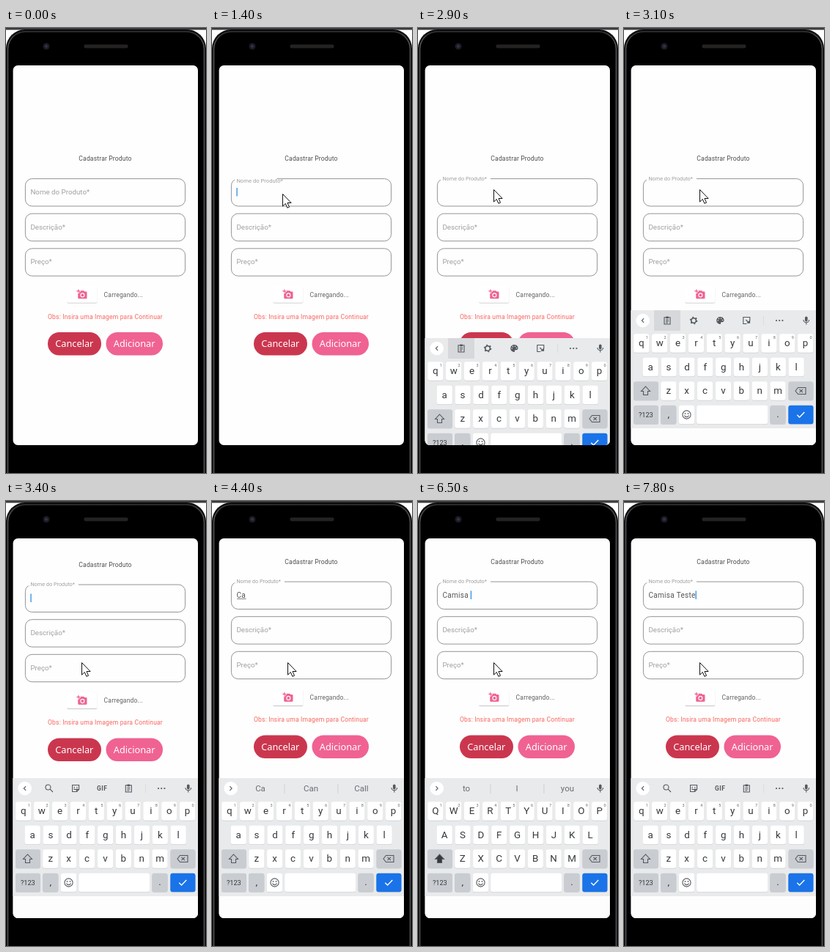
An HTML page for the animation above (8000 ms loop, 273 px wide and 607 px high).

```html
<!DOCTYPE html>
<html lang="pt">
<head>
<meta charset="utf-8">
<style>
html, body { margin: 0; width: 100%; height: 100%; overflow: hidden; background: #000; }
svg { display: block; width: 273px; height: 607px; font-family: Roboto, sans-serif; }
text { white-space: pre; }
.body { font-size: 8.58px; letter-spacing: .153px; }
.label { font-size: 9.75px; fill: #a0a0a0; }
.typed { font-size: 10px; letter-spacing: .3px; fill: #555; }
.button { font: 12.75px "Noto Sans", "Open Sans", sans-serif; fill: #fff; text-anchor: middle; }
.key { font-size: 13.4px; fill: #36393d; text-anchor: middle; }
.digit { font-size: 5.6px; fill: #666a70; text-anchor: middle; }
.word { font-size: 11.5px; fill: #6a6e73; text-anchor: middle; }
.line { fill: none; stroke: #55595e; stroke-width: 1.1; }
</style>
</head>
<body>
<svg viewBox="0 0 273 607">
  <defs>
    <clipPath id="screen"><rect x="9.6" y="51" width="252.4" height="518" rx="6.5"/></clipPath>
    <linearGradient id="rim" x2="1" y2="0">
      <stop offset="0" stop-color="#55585c"/><stop offset=".05" stop-color="#333538"/>
      <stop offset=".95" stop-color="#333538"/><stop offset="1" stop-color="#55585c"/>
    </linearGradient>
    <filter id="shadow" x="-20%" y="-20%" width="140%" height="160%">
      <feDropShadow dx="0" dy=".8" stdDeviation=".7" flood-opacity=".28"/>
    </filter>
  </defs>

  <rect width="273" height="607" fill="#fff"/>
  <rect width="273" height="2.5" fill="#3a3a3d"/>
  <rect x="0" y="2" width="273" height="650" rx="26" fill="#0b0b0c"/>
  <rect x="2.5" y="5" width="268" height="650" rx="24" fill="#000" stroke="url(#rim)" stroke-width="1.5"/>
  <circle cx="55" cy="25" r="4.5" fill="#1b1b24"/>
  <circle cx="55" cy="25" r="2" fill="#33334a"/>
  <rect x="106.5" y="22.5" width="60" height="5" rx="2" fill="#252222"/>

  <g clip-path="url(#screen)">
    <rect x="9" y="51" width="254" height="519" fill="#fefefe"/>
    <g id="page">
      <text class="body" x="135.5" y="181" text-anchor="middle" fill="#4c4c4c">Cadastrar Produto</text>
      <g id="fields"></g>
      <rect id="gap" x="29" y="204" height="3" fill="#fefefe"/>
      <text id="name" class="label">Nome do Produto*</text>
      <text class="label" x="33.4" y="274.6">Descrição*</text>
      <text class="label" x="33.4" y="322.2">Preço*</text>
      <text id="typed" class="typed" x="33.5" y="227.3"></text>
      <rect id="underline" x="34" y="228.5" height=".8" fill="#666"/>
      <rect id="caret" y="218" width="1.3" height="11.5" fill="#2f8fe0"/>
      <rect x="83" y="352" width="41.5" height="22.5" rx="2" fill="#fff" filter="url(#shadow)"/>
      <path transform="translate(96.4 355.8) scale(.613)" fill="#f06292" fill-rule="evenodd" d="M3 4V1h2v3h3v2H5v3H3V6H0V4zM6 10V7h3V4h7l1.8 2H21a2 2 0 0 1 2 2v12a2 2 0 0 1-2 2H5a2 2 0 0 1-2-2V10zM13 19a5 5 0 1 0 0-10 5 5 0 0 0 0 10zM13 17.2a3.2 3.2 0 1 1 0-6.4 3.2 3.2 0 0 1 0 6.4z"/>
      <text class="body" x="133.6" y="366.5" fill="#606060">Carregando...</text>
      <text class="body" x="135.5" y="396.6" text-anchor="middle" fill="#f8665e">Obs: Insira uma Imagem para Continuar</text>
      <rect x="57" y="415" width="73" height="31.5" rx="15.7" fill="#cb364f"/>
      <text class="button" x="93.3" y="435.2">Cancelar</text>
      <rect x="136.5" y="415" width="77.5" height="31.5" rx="15.7" fill="#f06292"/>
      <text class="button" x="175.2" y="435.2">Adicionar</text>
    </g>

    <g id="keyboard">
      <rect x="9" y="378" width="254" height="220" fill="#fdfdfd"/>
      <rect x="9" y="378" width="254" height="161" fill="#e8eaec"/>
      <g id="bar"></g>
      <g id="keys"></g>
    </g>
  </g>
  <path id="pointer" d="M0 0V16.6L3.8 13 6.4 18.8 9 17.7 6.5 12H11.6Z" fill="#fff" stroke="#111"/>
</svg>

<script>
const LOOP = 8000;
const $ = id => document.getElementById(id);
const set = (id, attrs) => Object.entries(attrs).forEach(([k, v]) => $(id).setAttribute(k, v));

const rect = (x, y, w, h, fill, rx = 3) =>
  `<rect x="${x}" y="${y}" width="${w}" height="${h}" rx="${rx}" fill="${fill}"/>`;
const text = (cls, x, y, s, extra = "") => `<text class="${cls}" x="${x}" y="${y}" ${extra}>${s}</text>`;
const at = (x, y, body) => `<g transform="translate(${x} ${y})">${body}</g>`;
const line = (d, extra = "") => `<path class="line" d="${d}" ${extra}/>`;
const dot = (x, y, r, fill) => `<circle cx="${x}" cy="${y}" r="${r}" fill="${fill}"/>`;

const INK = "#55595e";
const ICONS = {
  search: line("M1.2 1.2L5 5M2-1.5A3.5 3.5 0 1 1-5-1.5 3.5 3.5 0 1 1 2-1.5"),
  sticker: line("M-4.5-4.5H4.5V1.5L1.5 4.5H-4.5ZM4.5 1.5H1.5V4.5M-2.5 .5Q0 3 2.5 .5") +
    dot(-1.8, -1.5, .8, INK) + dot(1.8, -1.5, .8, INK),
  gif: text("", 0, 3, "GIF", `font-size="8.4" font-weight="700" letter-spacing=".5" text-anchor="middle" fill="${INK}"`),
  clipboard: line("M-4-4.2H4V5H-4ZM-2-1H2M-2 1H2M-2 3H1") + rect(-2, -5.6, 4, 2.8, INK, 1),
  gear: `<circle r="3.3" class="line" style="stroke-width:1.6"/>` +
    `<circle r="4.6" class="line" style="stroke-width:1.4" stroke-dasharray="1.9 2.92"/>`,
  palette: `<path fill="${INK}" d="M0-5A5 5 0 0 0 0 5C1.5 5 .5 3.5 1 2.6 1.3 2 2 2.2 3 2.2 7 2 6-5 0-5Z"/>` +
    [[-3, 0], [-1.8, -2.6], [1.4, -2.8], [3.3, -.5]].map(([x, y]) => dot(x, y, .8, "#e8eaec")).join(""),
  resize: line("M4.5 0V-4.5H-4.5V4.5H0M-1-1L3 3") +
    `<path d="M0 3.8H4.8V-1Z" fill="${INK}"/>`,
  dots: [-4.2, 0, 4.2].map(x => dot(x, 0, 1.1, INK)).join(""),
  mic: rect(-1.8, -5.5, 3.6, 7, INK, 1.8) + line("M-3.8-1A3.8 3.8 0 0 0 3.8-1M0 3V5.6")
};
const TOOLS = ["search", "sticker", "gif", "clipboard"];
const SETUP = ["clipboard", "gear", "palette", "resize"];

function drawBar(bar) {
  const words = typeof bar === "string";
  const chevron = words ? "M-1.4-2.8L1.4 0-1.4 2.8" : "M1.4-2.8L-1.4 0 1.4 2.8";
  let out = bar === SETUP ? rect(41, 378, 36, 28, "#d6d8db", 0) : "";
  out += at(25.7, 392, dot(0, 0, 9.3, "#fff") + line(chevron)) + at(248.8, 392, ICONS.mic);
  if (words) {
    out += bar.split("|").map((w, i) => text("word", 66 + 69 * i, 396.2, w)).join("");
    out += rect(98.5, 386, .8, 13, "#c8ccd1", 0) + rect(171.5, 386, .8, 13, "#c8ccd1", 0);
  } else {
    out += bar.map((name, i) => at(59 + 36.1 * i, 392, ICONS[name])).join("");
    out += rect(190, 386, .7, 12, "#d5d8dc", 0) + at(212.2, 392, ICONS.dots);
  }
  return out;
}

function drawKeys(upper) {
  const PITCH = 24.87, GRAY = "#c9ccd1", H = 25.5;
  const key = (x, y, w, fill) => rect(x, y + .8, w, H, "#cccfd3") + rect(x, y, w, H, fill);
  const letters = (row, x0, y) => [...row].map((c, i) => {
    const x = x0 + PITCH * i;
    return key(x - 10.6, y - 12.7, 21.2, "#fff") + text("key", x, y + 4.4, upper ? c.toUpperCase() : c);
  }).join("");
  const digits = [..."1234567890"].map((d, i) => text("digit", 31.3 + PITCH * i, 417, d)).join("");
  const shift = `<path class="line" d="M0-6L6 .5H3V5.5H-3V.5H-6Z" ${upper ? `style="fill:#36393d"` : ""}/>`;
  return letters("qwertyuiop", 23.8, 423) + digits + letters("asdfghjkl", 36.2, 455.5) +
    letters("zxcvbnm", 60.8, 488) +
    key(13, 475.3, 34, GRAY) + at(29.5, 488, shift) +
    key(224.5, 475.3, 34, GRAY) + at(241, 488, line("M-7 0L-3.5-4.5H7V4.5H-3.5ZM-1.5-2.2L3 2.2M3-2.2L-1.5 2.2")) +
    key(13, 507.8, 34, GRAY) + text("key", 29.8, 524, "?123", `style="font-size:9.2px"`) +
    key(50, 507.8, 21.4, GRAY) + text("key", 60.8, 524, ",") +
    key(74.8, 507.8, 21.4, "#fff") +
    at(85.5, 520.5, `<circle r="5.6" class="line"/>` + line("M-3 1A3.2 3.2 0 0 0 3 1") +
      dot(-2, -1.6, .9, INK) + dot(2, -1.6, .9, INK)) +
    key(99.2, 507.8, 97, "#fff") +
    key(199.3, 507.8, 21.4, GRAY) + text("key", 210, 524, ".") +
    key(224.3, 507.8, 34.2, "#1a73e8") + at(241.3, 520.5, line("M-5 .2L-1.7 3.5 5-3.4", `style="stroke:#fff;stroke-width:1.4"`));
}

// Each entry changes only the listed properties from its time on.
const START = { pointer: [13, -30], float: 0, caret: 0, scroll: 0, slide: 200, bar: SETUP, value: "", composing: 0, upper: false };
const STEPS = [
  [200, { pointer: [13, 2] }],
  [300, { pointer: [22, 40] }],
  [400, { pointer: [45, 95] }],
  [500, { pointer: [76, 152] }],
  [600, { pointer: [103, 198] }],
  [700, { pointer: [115, 224] }],
  [800, { pointer: [102, 233] }],
  [1000, { pointer: [99, 230] }],
  [1100, { pointer: [97, 227], float: .2 }],
  [1200, { pointer: [96.5, 226.5], float: .55, caret: 1 }],
  [1400, { float: .85 }],
  [1500, { pointer: [98, 225], float: 1 }],
  [1600, { pointer: [101, 223] }],
  [1700, { pointer: [102.5, 221.5] }],
  [1800, { pointer: [103.5, 220.5], caret: 0 }],
  [2400, { caret: .5 }],
  [2500, { caret: 1 }],
  [2800, { slide: 130, caret: .5 }],
  [2900, { slide: 45, caret: 0 }],
  [3100, { slide: 7 }],
  [3400, { slide: 0, scroll: -91.5, bar: TOOLS, caret: 1 }],
  [3600, { scroll: -95.5 }],
  [3800, { value: "Ca" }],
  [4000, { composing: 2 }],
  [4100, { bar: "Ca|Can|Call" }],
  [4400, { caret: 0 }],
  [4800, { caret: 1 }],
  [5000, { value: "Cam", composing: 0 }],
  [5300, { value: "Cami", bar: TOOLS }],
  [5400, { value: "Camis" }],
  [5600, { value: "Camisa" }],
  [5800, { composing: 6, bar: "Camisa|Camisa's|Camisas" }],
  [6100, { value: "Camisa ", composing: 0 }],
  [6300, { bar: "to|I|you" }],
  [6400, { upper: true }],
  [6800, { value: "Camisa T", upper: false }],
  [7000, { value: "Camisa Te", bar: TOOLS }],
  [7400, { value: "Camisa Test" }],
  [7600, { value: "Camisa Teste" }]
];

$("fields").innerHTML = [0, 1, 2].map(i =>
  `<rect x="26.4" y="${205.6 + 47.6 * i}" width="218.2" height="37.4" rx="9.2" fill="none" stroke="#8a8a8a" stroke-width=".9"/>`).join("");

const shown = {};
function redraw(id, value, draw) {
  if (shown[id] === value) return;
  shown[id] = value;
  $(id).innerHTML = draw(value);
}

function update(t) {
  const s = Object.assign({}, START, ...STEPS.filter(([time]) => time <= t).map(([, patch]) => patch));
  set("pointer", { transform: `translate(${s.pointer})` });
  set("page", { transform: `translate(0 ${s.scroll})` });
  set("keyboard", { transform: `translate(0 ${s.slide})` });
  set("name", { transform: `translate(33.4 ${227.3 - 19.6 * s.float}) scale(${1 - .25 * s.float})` });
  set("gap", { width: 70 * s.float });
  redraw("bar", s.bar, drawBar);
  redraw("keys", s.upper, drawKeys);
  const typed = $("typed");
  if (typed.textContent !== s.value) typed.textContent = s.value;
  const width = n => n ? typed.getSubStringLength(0, n) : 0;
  set("underline", { width: width(s.composing) });
  set("caret", { x: 33.4 + width(s.value.length), opacity: s.caret });
}

const begin = performance.now();
function tick() {
  update((performance.now() - begin) % LOOP);
  requestAnimationFrame(tick);
}
tick();
</script>
</body>
</html>
```
